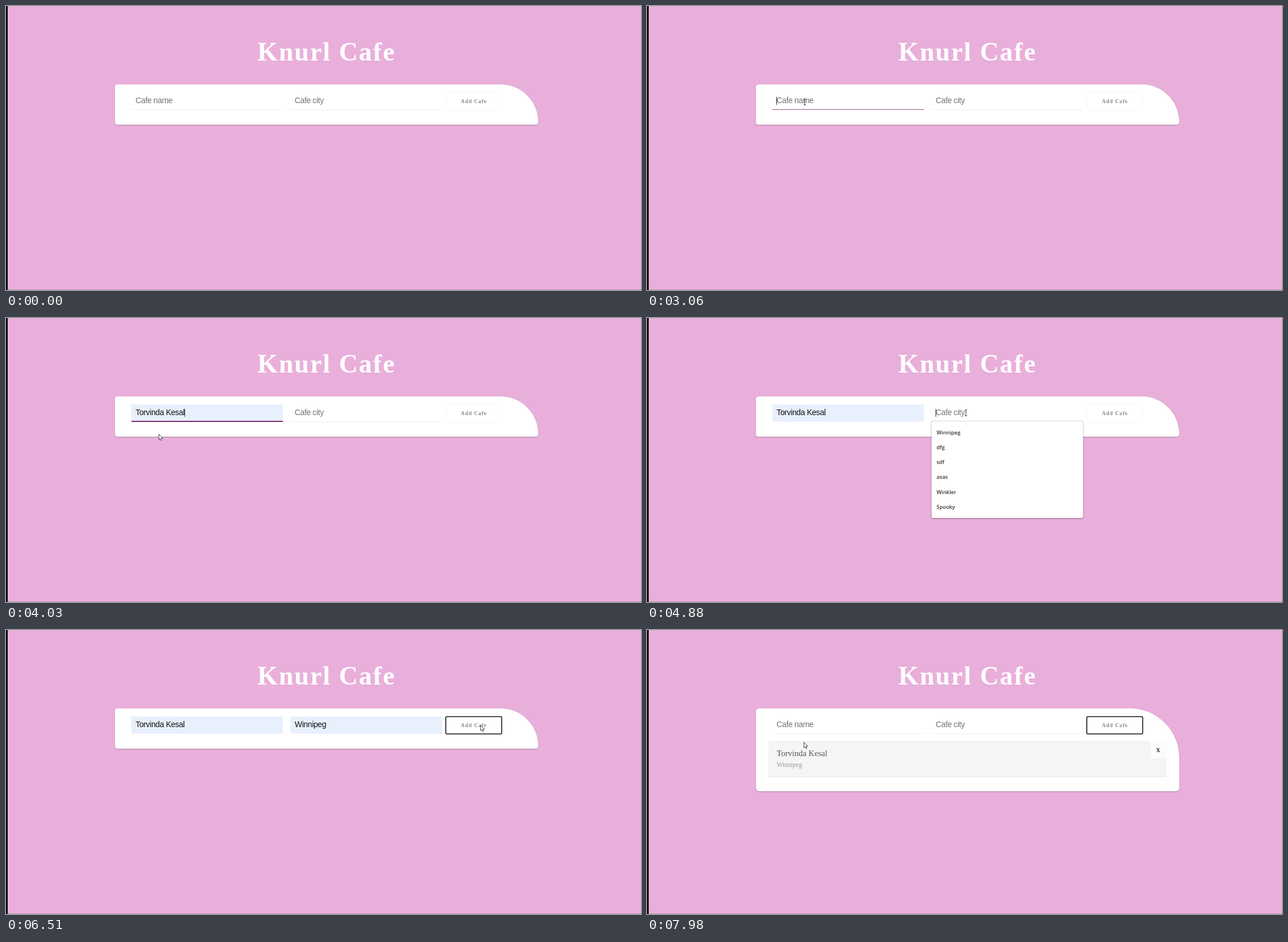
Write an HTML page that moves like this. It is 1119x500 px and loops after 8 s.

```html
<!DOCTYPE html>
<html lang="en">
<head>
<meta charset="utf-8">
<title>Cafe list</title>
<style>
  html, body { margin: 0; width: 100%; height: 100%; overflow: hidden; background: #e9afdb; }
  #card {
    position: absolute; left: 192px; top: 138px; width: 746px;
    background: #fff; border-radius: 6px 87px 6px 6px;
    box-shadow: 0 .67px 2px rgba(0, 0, 0, .12), 0 .67px 1.33px rgba(0, 0, 0, .24);
  }
  svg { position: absolute; left: 0; top: 0; display: block; }
  text { white-space: pre; }
  .serif { font-family: "Liberation Serif", "Times New Roman", serif; }
  .field { font: 14px "Liberation Sans", Arial, sans-serif; letter-spacing: -.38px; }
  .option { font: 600 9.3px "Open Sans", "Noto Sans", sans-serif; fill: #333; }
  .menu { fill: #fff; filter: drop-shadow(0 1px 1.5px rgba(0, 0, 0, .4)); }
</style>
</head>
<body>
<div id="card"></div>
<svg width="1119" height="500" viewBox="0 0 1119 500">
  <rect y="499" width="1119" height="1" fill="#bd9db4"/>
  <rect width="3" height="500" fill="#000"/>
  <text class="serif" x="443" y="96" font-size="46" font-weight="700" letter-spacing="2" fill="#fff">Knurl Cafe</text>

  <g id="fields"></g>

  <rect id="button" x="775" y="152.5" width="98.5" height="30.5" rx="2" fill="#fff"/>
  <text class="serif" x="801.5" y="171" font-size="9.3" font-weight="700" letter-spacing="1" fill="#8b868d">Add Cafe</text>

  <g id="item" class="serif">
    <rect x="214" y="195" width="701.5" height="63" fill="#f5f5f5"/>
    <rect x="214" y="258" width="701.5" height="1" fill="#e6e6e6"/>
    <rect x="887" y="195" width="28.5" height="30.5" fill="#fcfcfc"/>
    <text x="897.3" y="215" font-size="14" font-weight="700" fill="#444">x</text>
    <text id="itemName" x="228.5" y="222" font-size="14.6" fill="#555"></text>
    <text id="itemCity" x="228.5" y="241" font-size="11.5" fill="#999"></text>
  </g>

  <g id="menus"></g>

  <path id="arrow" d="M.5 .5V10.2L2.7 8.2L4.2 11.7L5.9 11L4.4 7.6H7.2Z" fill="#fff" stroke="#333" stroke-width=".9"/>
  <path id="beam" d="M-2 -5H2M0 -5V5M-2 5H2" fill="none" stroke="#333"/>
</svg>
<script>
const LOOP = 8000, STEP = 77, CLICKED_ADD = 6420, ADDED = 6570;
const NAME = 'Torvinda Kesal', CITY = 'Winnipeg';
const FIELD_WIDTH = 267, ROW = 26.25;
const byId = id => document.getElementById(id);
const show = (el, on) => el.setAttribute('visibility', on ? 'visible' : 'hidden');
const between = (t, from, to) => t >= from && t < to;

function set(el, attrs) {
  for (const key in attrs) el.setAttribute(key, attrs[key]);
  return el;
}
function make(tag, attrs, parent) {
  return parent.appendChild(set(document.createElementNS('http://www.w3.org/2000/svg', tag), attrs));
}

const inputs = [
  { x: 221, hint: 'Cafe name', value: NAME, focus: 2930, open: 3120, preview: 3640, pick: 3950, blur: 4810,
    options: [NAME, 'dfg', 'sdf', 'asas', 'test', 'abc'] },
  { x: 501.5, hint: 'Cafe city', value: CITY, focus: 4810, open: 4880, preview: 5270, pick: 5580, blur: CLICKED_ADD,
    options: [CITY, 'dfg', 'sdf', 'asas', 'Winkler', 'Spooky'] }
];

for (const input of inputs) {
  const { x } = input, width = FIELD_WIDTH, fields = byId('fields');
  input.fill = make('rect', { x, y: 152.3, width, height: 30.4, fill: '#e8f0fe' }, fields);
  input.line = make('rect', { x, width }, fields);
  input.text = make('text', { x: x + 7.3, y: 171, class: 'field' }, fields);
  input.caret = make('rect', { y: 160, width: 1, height: 14, fill: '#222' }, fields);

  input.menu = make('g', {}, byId('menus'));
  make('rect', { x, y: 182, width, height: 170, rx: 3, class: 'menu' }, input.menu);
  input.hover = make('rect', { x, y: 188, width, height: ROW, fill: '#eee' }, input.menu);
  input.options.forEach((label, i) => {
    make('text', { x: x + 8.8, y: 204.7 + i * ROW, class: 'option' }, input.menu).textContent = label;
  });
}
byId('itemName').textContent = NAME;
byId('itemCity').textContent = CITY;

// Each move continues from the last one; "via" bends it into a curve.
const pointerStart = [850, 495];
const moves = [
  { start: 630, end: 1380, via: [1046, 353], to: [340, 124] },
  { start: 1460, end: 2230, via: [110, 295], to: [275, 187] },
  { start: 2300, end: 2610, to: [278, 169] },
  { start: 3550, end: 3810, to: [269, 204] },
  { start: 4060, end: 4650, to: [562, 167] },
  { start: 5120, end: 5890, via: [555, 225], to: [563, 191] },
  { start: 5970, end: 6190, to: [836, 167] },
  { start: 6740, end: 7510, via: [355, 330], to: [493, 318] },
  { start: 7580, end: 7980, via: [280, 320], to: [276, 197] }
];

// The pointer advances in even steps along a quadratic curve.
function pointerAt(t) {
  const index = moves.findLastIndex(move => t >= move.start);
  if (index < 0) return null;
  const { start, end, via, to } = moves[index];
  const from = index ? moves[index - 1].to : pointerStart;
  const gaps = Math.round((end - start) / STEP);
  const step = Math.min(gaps, Math.floor((t - start) / (end - start) * gaps + 1e-6));
  const p = (step + 1) / (gaps + 1), q = 1 - p;
  return from.map((a, axis) => {
    const b = to[axis], bend = via ? via[axis] : (a + b) / 2;
    return q * q * a + 2 * q * p * bend + p * p * b;
  });
}

function drawInput(input, t) {
  const focused = between(t, input.focus, input.blur);
  const filled = between(t, input.preview, ADDED);
  const picked = between(t, input.pick, ADDED);
  const open = between(t, input.open, input.pick);
  show(input.fill, filled);
  input.text.textContent = filled ? input.value : input.hint;
  set(input.text, { fill: filled ? '#111' : '#757078' });

  const strength = Math.min(1, Math.max(0, (t - input.focus) / 300));
  const height = focused ? 1 + strength : 1;
  set(input.line, {
    y: 183 - height, height,
    fill: focused ? '#7b2a6e' : '#ededed',
    opacity: focused ? .3 + .7 * strength : 1
  });
  show(input.line, focused || !filled);

  const caretOffset = picked ? input.text.getComputedTextLength() : 0;
  set(input.caret, { x: input.x + 7 + caretOffset });
  show(input.caret, focused && (picked || !filled));
  show(input.menu, open);
  show(input.hover, open && filled);
}

function drawPointer(t) {
  const point = pointerAt(t);
  const overInput = point && between(point[1], 152, 183) &&
    inputs.some(({ x }) => between(point[0], x, x + FIELD_WIDTH));
  show(byId('arrow'), point && !overInput);
  show(byId('beam'), overInput);
  if (point) {
    for (const id of ['arrow', 'beam']) set(byId(id), { transform: `translate(${point})` });
  }
}

function draw(t) {
  const added = t >= ADDED, outlined = t >= CLICKED_ADD;
  byId('card').style.height = (added ? 146 : 71) + 'px';
  show(byId('item'), added);
  set(byId('button'), {
    stroke: outlined ? '#111' : '#f7f5f7',
    'stroke-width': outlined ? 1.6 : 1
  });
  inputs.forEach(input => drawInput(input, t));
  drawPointer(t);
}

let origin;
function tick(now) {
  origin ??= now;
  draw((now - origin) % LOOP);
  requestAnimationFrame(tick);
}
draw(0);
requestAnimationFrame(tick);
</script>
</body>
</html>
```
